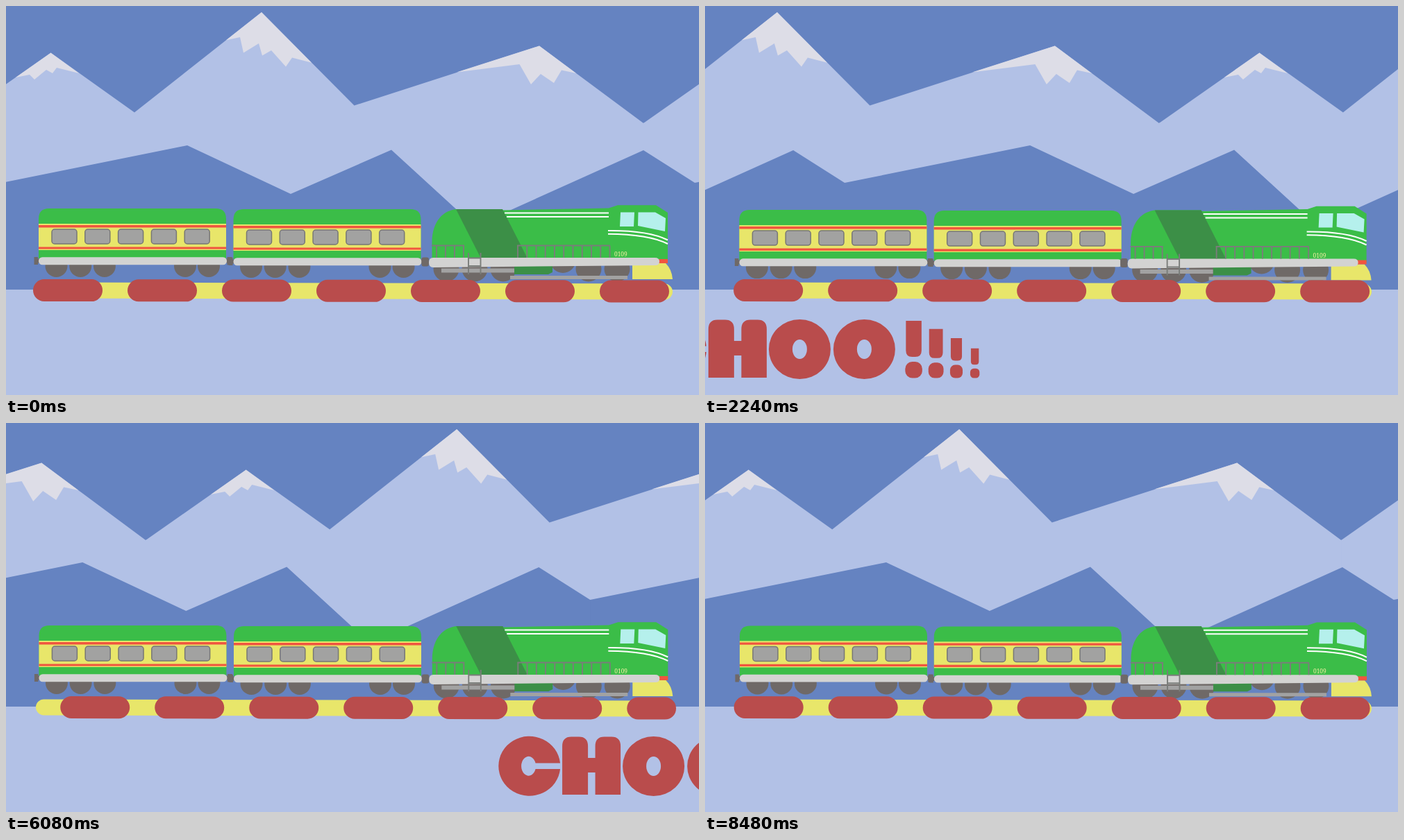
Animation of 998x561 px, one loop 8520 ms. Source, as an HTML page:

```html
<!DOCTYPE html>
<html lang="en">
<head>
<meta charset="utf-8">
<title>Train in the mountains</title>
<style>
  html, body { margin: 0; width: 100%; height: 100%; overflow: hidden; background: #6583c1; }
  svg { display: block; width: 100vw; height: 100vh; }
  .light { fill: #b2c1e6; }
  .dark { fill: #6583c1; }
  .snow { fill: #dddde7; }
  .red { fill: #b94c4c; }
  .yellow { fill: #e8e66a; }
  .green { fill: #3bbd48; }
  .forest { fill: #3c8f47; }
  .wheel { fill: #6f6967; }
  .steel { fill: #d3d3d2; }
  .step { fill: #a2a2a2; }
  .stripe { fill: #f1553f; }
  .pane { fill: #a2a2a1; stroke: #777775; stroke-width: 1.5; }
  .glass { fill: #b5f0ec; }
  .trim { fill: none; stroke: #fff; stroke-width: 2; }
  .rail { fill: none; stroke: #7a7d7a; stroke-width: 1.9; }
  .plate { font: 8.4px "Noto Serif", "Liberation Serif", serif; fill: #f2eea2; }
  .track { fill: none; stroke-linecap: round; }
</style>
</head>
<body>
<svg viewBox="0 0 998 561" preserveAspectRatio="none">
  <defs>
    <!-- One span of each ridge; the last point overlaps the next span. -->
    <g id="peaks">
      <path class="light" d="M-80 420V169L64.5 67.5L185 153.5L368 9L501.5 143.5L768 57.5L918 169L919.4 168V420Z"/>
      <path class="snow" d="M64.5 67.5L14 103L34 99L41 106L58 92L67 97L73 89L105 97Z"/>
      <path class="snow" d="M368 9L317 49.3L337 45L342 67.5L364 54L369 71.5L382 64L403 87.5L412 74.5L440 81.7Z"/>
      <path class="snow" d="M768 57.5L649 95.5L739.5 84L756 113L770 98L789 111L800 92.5L821 97Z"/>
    </g>
    <path id="hills" class="dark" d="M-6 420V255L261 201L410 271L555 207.5L675 317.5L918 208L992 255L993 254.8V420Z"/>

    <g id="car">
      <path class="wheel" d="M40.5 362H46V364.5H54V370.5H46V373H40.5ZM312 364.5H318.5V362H325.5V373.5H318.5V370.5H312Z"/>
      <g id="carWheels" class="wheel"></g>
      <path class="green" d="M47 364V307Q47 292 62 292H302Q317 292 317 307V364Z"/>
      <rect class="yellow" x="47" y="314" width="270" height="38"/>
      <path class="stripe" d="M47 316H317V319.4H47ZM47 347.4H317V350.6H47Z"/>
      <g id="panes" class="pane"></g>
      <rect class="steel" x="47" y="362.3" width="271" height="10.9" rx="5.3"/>
    </g>

    <g id="word">
      <path d="M178 490.5H142.5A10.5 14 0 1 0 142.5 499H178A44.5 43 0 1 1 178 490.5Z"/>
      <path d="M181 536V466Q181 452.5 194 452.5H205Q218 452.5 218 466V483H228.5V466Q228.5 452.5 241.5 452.5H252Q265 452.5 265 466V536H228.5V504H218V536Z"/>
      <path id="ring" fill-rule="evenodd" d="M268 495a44.5 43 0 1 1 89 0a44.5 43 0 1 1 -89 0ZM302 495a10.5 14 0 1 0 21 0a10.5 14 0 1 0 -21 0Z"/>
      <use href="#ring" x="93"/>
    </g>
  </defs>

  <rect class="dark" width="998" height="561"/>
  <g id="far"><use href="#peaks"/><use href="#peaks" x="998"/><use href="#peaks" x="1996"/></g>
  <g id="near"><use href="#hills"/><use href="#hills" x="998"/><use href="#hills" x="1996"/></g>
  <rect class="light" y="409" width="998" height="152"/>

  <use id="car1" href="#car"/>
  <use id="car2" href="#car" x="280.5" y="1"/>

  <g id="loco">
    <rect class="wheel" x="598.5" y="362.5" width="10.5" height="13" rx="3"/>
    <g id="locoWheels" class="wheel"></g>
    <path class="forest" d="M732 372H787V384L781 387H732Z"/>
    <path class="green" d="M613.5 365V340C614 310 630 294 650 293H715V294.5L868 291.5L881 287.3H936L953 298V368H613.5Z"/>
    <path class="forest" d="M648 293H715L751 364H684Z"/>
    <path class="trim" d="M718 298.5H868M721 304H868M867 324Q925 323.5 953 337.5M867 328.7Q925 329 953 343"/>
    <path class="glass" d="M885 297.5H905L904 318H884ZM910.5 297.5H935L950 306L949 325L910 317Z"/>
    <path class="yellow" d="M902 371H950Q959 380 960 394H902Z"/>
    <path class="stripe" d="M938 365H953V371H938Z"/>
    <path class="steel" d="M615 363H934.5Q941 363 941 368.5Q941 374 934.5 374L615 377Q609 377 609 370Q609 363 615 363Z"/>
    <path class="step" d="M627 378.5H732V384.5H627ZM726 389H895V394H726Z"/>
    <path id="rails" class="rail"/>
    <text class="plate" x="876" y="361">0109</text>
  </g>

  <path class="track" stroke="#e8e66a" stroke-width="23" d="M54.5 410L948.5 412"/>
  <path id="ties" class="track" stroke="#b94c4c" stroke-width="32" stroke-dasharray="68 68" d="M55 410L949 411.6"/>

  <g id="shout" class="red" role="img" aria-label="CHOO CHOO!!!!">
    <use href="#word"/>
    <use href="#word" x="417"/>
    <g id="marks"></g>
  </g>
</svg>
<script>
const $ = id => document.getElementById(id);
const SPAN = 998, STEP = 40, LOOP = 8520, TRAIN = 2840;

// Joins n pieces of markup, each made for an evenly spaced x.
const row = (n, from, gap, make) =>
  Array.from({ length: n }, (_, i) => make(from + i * gap)).join("");
const disc = (y, r) => x => `<circle cx="${x}" cy="${y}" r="${r}"/>`;
const post = x => `M${x} 345.5V363`;

$("carWheels").innerHTML = row(3, 72.5, 34.7, disc(375, 16)) + row(2, 258, 34, disc(375, 16));
$("panes").innerHTML = row(5, 66, 47.8, x => `<rect x="${x}" y="322" width="36" height="21" rx="4"/>`);
$("locoWheels").innerHTML = row(3, 634, 41, disc(379, 18.5)) + row(2, 839, 41, disc(379, 18.5)) + disc(366.5, 18.5)(802);
$("rails").setAttribute("d", "M613 345.5H660M736 345.5H870" + row(4, 620, 13, post) + row(11, 737, 13.25, post) +
  "M666 356V387M683.5 356V387M666 363.5H683.5M666 375H683.5");

// Exclamation marks shrink along gentle curves.
$("marks").innerHTML = row(4, 0, 1, i => {
  const w = 22.5 - 2.2 * i - 0.5 * i * i, r = w * 0.4;
  const x = 893.7 + 33.4 * i - 1.35 * i * i - w / 2;
  const top = 454 + 11 * i + 0.75 * i * i;
  const end = 506 + 0.9 * i + 0.95 * i * i;
  const dot = end + 7 - i / 2;
  return `<path d="M${x} ${top}h${w}V${end - r}q0 ${r} ${-r} ${r}h${2 * r - w}q${-r} 0 ${-r} ${-r}Z"/>
    <rect x="${x - 1}" y="${dot}" width="${w + 2}" height="${536.5 - dot}" rx="${w * 0.45}"/>`;
});

const move = (id, x, y = 0) => $(id).setAttribute("transform", `translate(${x} ${y})`);

function draw(t) {
  move("far", -(t * 0.1179 % SPAN));
  move("near", -(t * 0.35308 % SPAN));

  // The cars drift forward and dip once, late in each cycle.
  const u = t % TRAIN / TRAIN;
  const dip = Math.sin(Math.PI * u ** 4);
  move("car1", 3 * u, 2.2 * dip);
  move("car2", 2.3 * Math.sin(Math.PI / 2 * u), 2.2 * dip);
  move("loco", 0.4 * Math.sin(2 * Math.PI * u), 1.6 * dip);

  $("ties").setAttribute("stroke-dashoffset", 687 * u);
  move("shout", (1360 - t % 5640) * 0.674);
}

const start = performance.now();
function tick() {
  const t = (performance.now() - start) % LOOP;
  draw(Math.floor(t / STEP) * STEP);
  requestAnimationFrame(tick);
}
tick();
</script>
</body>
</html>
```
